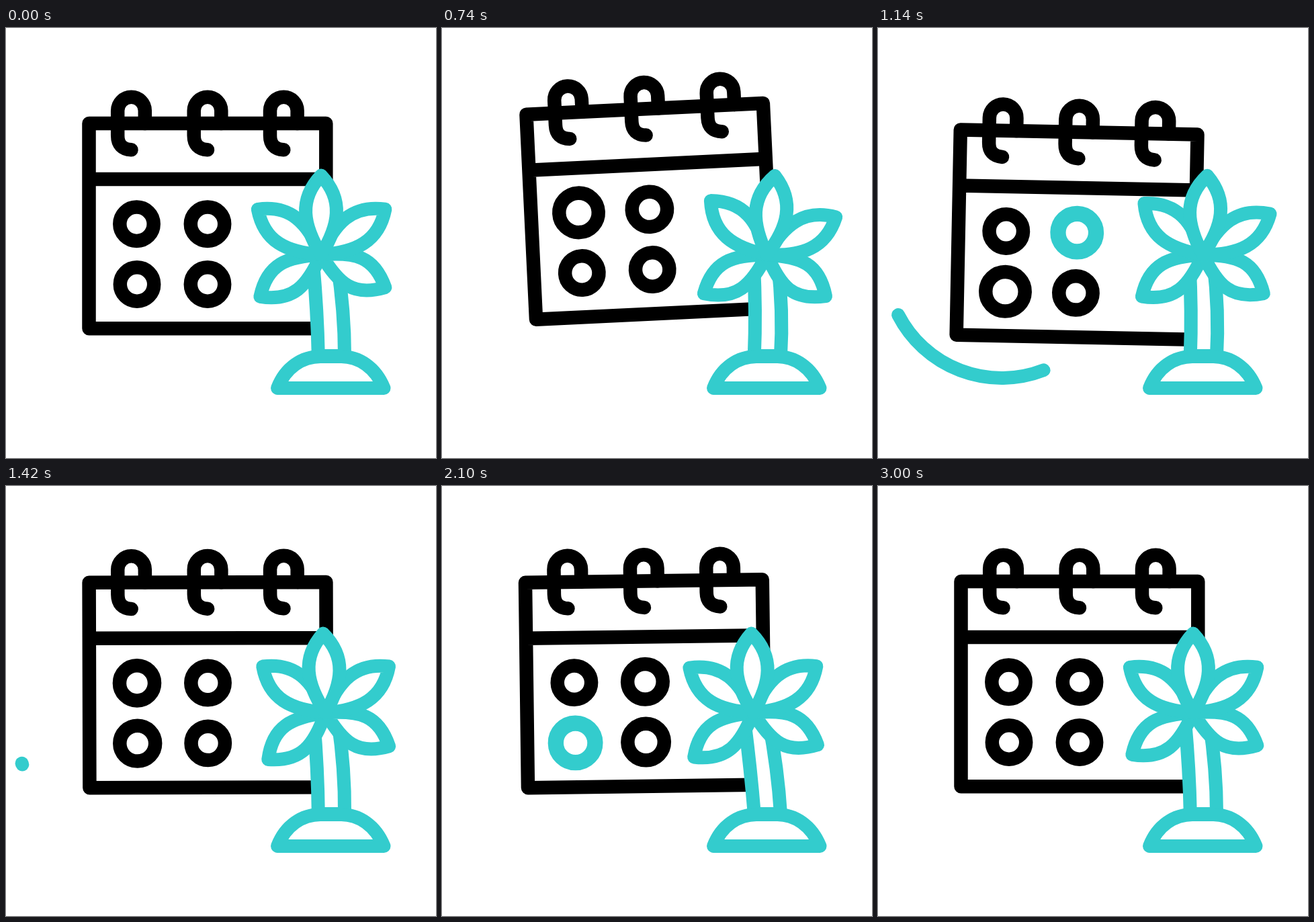
Animation, 640 px wide and 640 px high, one loop 3.6 s. Source, as an HTML page with a canvas:

```html
<!DOCTYPE html>
<html lang="en">
<head>
<meta charset="utf-8">
<title>Holiday calendar</title>
<style>
  html, body { margin: 0; height: 100%; overflow: hidden; background: #fff; }
  canvas { display: block; width: 640px; height: 640px; }
</style>
</head>
<body>
<canvas id="stage" width="640" height="640"></canvas>
<script>
const LOOP = 3600, PULSE = 800, TEAL = [51, 204, 205], BLACK = [0, 0, 0];
const c = document.getElementById('stage').getContext('2d');
const rad = deg => deg * Math.PI / 180;
const clamp = x => Math.min(1, Math.max(0, x));
const rgb = v => `rgb(${v.map(Math.round)})`;
const ease = (t, from, to) => (1 - Math.cos(Math.PI * clamp((t - from) / (to - from)))) / 2;
const pulse = (t, from) => Math.sin(Math.PI * clamp((t - from) / PULSE)) ** 2;

// Swing from rest to one side, to the other side and back to rest
const swing = (t, right, left, [begin, toRight, toLeft, end]) =>
  right * ease(t, begin, toRight) + (left - right) * ease(t, toRight, toLeft) - left * ease(t, toLeft, end);

function draw(d, color, fill) {
  const p = new Path2D(d);
  if (fill) { c.fillStyle = '#fff'; c.fill(p); }
  c.strokeStyle = rgb(color);
  c.stroke(p);
}

// Each dot swells at its start times; the one at "hot" is teal
const DOTS = [
  { x: 194.5, y: 291.7, starts: [370, 1300] },
  { x: 300, y: 291.7, starts: [610, 1440], hot: 610 },
  { x: 195, y: 381.5, starts: [770, 1700], hot: 1700 },
  { x: 300, y: 381.5, starts: [1500] }
];

function dot(t, { x, y, starts, hot }) {
  const grow = Math.max(...starts.map(s => pulse(t, s)));
  const tint = hot ? clamp((pulse(t, hot) - 0.4) / 0.3) : 0;
  c.lineWidth = 20.5 + 2.8 * tint;
  c.strokeStyle = rgb(BLACK.map((v, i) => v + (TEAL[i] - v) * tint));
  c.beginPath();
  c.arc(x, y, 25.2 + 4.1 * grow, 0, 7);
  c.stroke();
}

function calendar(t) {
  // Two hops with a dip between them
  const dip = ease(t, 720, 1220) - ease(t, 1220, 1700);
  const rise = 37 * dip - 21.8 * (ease(t, 200, 580) - ease(t, 1700, 2140));
  const tilt = 4.15 * dip - 2.75 * (ease(t, 400, 740) - ease(t, 1710, 2310));
  c.save();
  c.translate(300, 105 + rise);
  c.rotate(rad(tilt));
  c.translate(-300, -105);
  c.lineWidth = 20.5;
  draw('M123.5 142H476.3V447.3H123.5ZM123.5 225H476.3', BLACK);
  for (const x of [186.5, 300, 413.3])
    draw(`M${x + 20.3} 142V123a20.3 20.3 0 0 0-40.6 0V160q0 20 20.3 21.3`, BLACK);
  DOTS.forEach(d => dot(t, d));
  c.restore();
}

// Arc drawn from one end and erased the same way
function gust(t, x, y, r, from, to, begin) {
  const a = from + (to - from) * ease(t, begin + 205, begin + 585);
  const b = from + (to - from) * ease(t, begin, begin + 335);
  if (b - a < 0.01) return;
  c.lineWidth = 20;
  c.strokeStyle = rgb(TEAL);
  c.beginPath();
  c.arc(x, y, r, rad(a), rad(b));
  c.stroke();
}

const STEM = [200, 920, 1980, 3000], FLUTTER = [200, 820, 1700, 2360];
// Resting angle from upright, length, turn when blown to the right
const LEAVES = [[-124.5, 110, 3], [117, 107, 8.5], [-54.3, 116, 8.5], [54.6, 117, 7], [0, 118, 6]];

function palm(t) {
  const crown = swing(t, 17, -6, STEM), s = swing(t, 8, -7, STEM);
  c.lineWidth = 20;
  draw(`M${457 + s} 350Q${463.5 + s * 0.6} 422 464.8 488H504Q${504 + s * 0.6} 422 ${493 + s} 350`, TEAL, true);
  draw('M404 536H562.5C550 505 525 489 499 489H468C441 489 416 505 404 536Z', TEAL, true);
  for (const [angle, len, right] of LEAVES) {
    c.save();
    c.translate(469 + crown, 337.5);
    c.rotate(rad(angle + swing(t, right, right - 10, FLUTTER)));
    draw(`M0 0C-27 -44 -34 ${36 - len} 0 ${-len}C34 ${36 - len} 27 -44 0 0Z`, TEAL, true);
    c.restore();
  }
}

function frame(now) {
  const t = Math.max(0, now - start) % LOOP;
  c.fillStyle = '#fff';
  c.fillRect(0, 0, 640, 640);
  c.lineCap = c.lineJoin = 'round';
  calendar(t);
  gust(t, 184, 348, 173, 58, 158, 855);
  gust(t, 458, 314, 168, -74, -20, 2140);
  palm(t);
  requestAnimationFrame(frame);
}

const start = performance.now();
frame(start);
</script>
</body>
</html>
```
